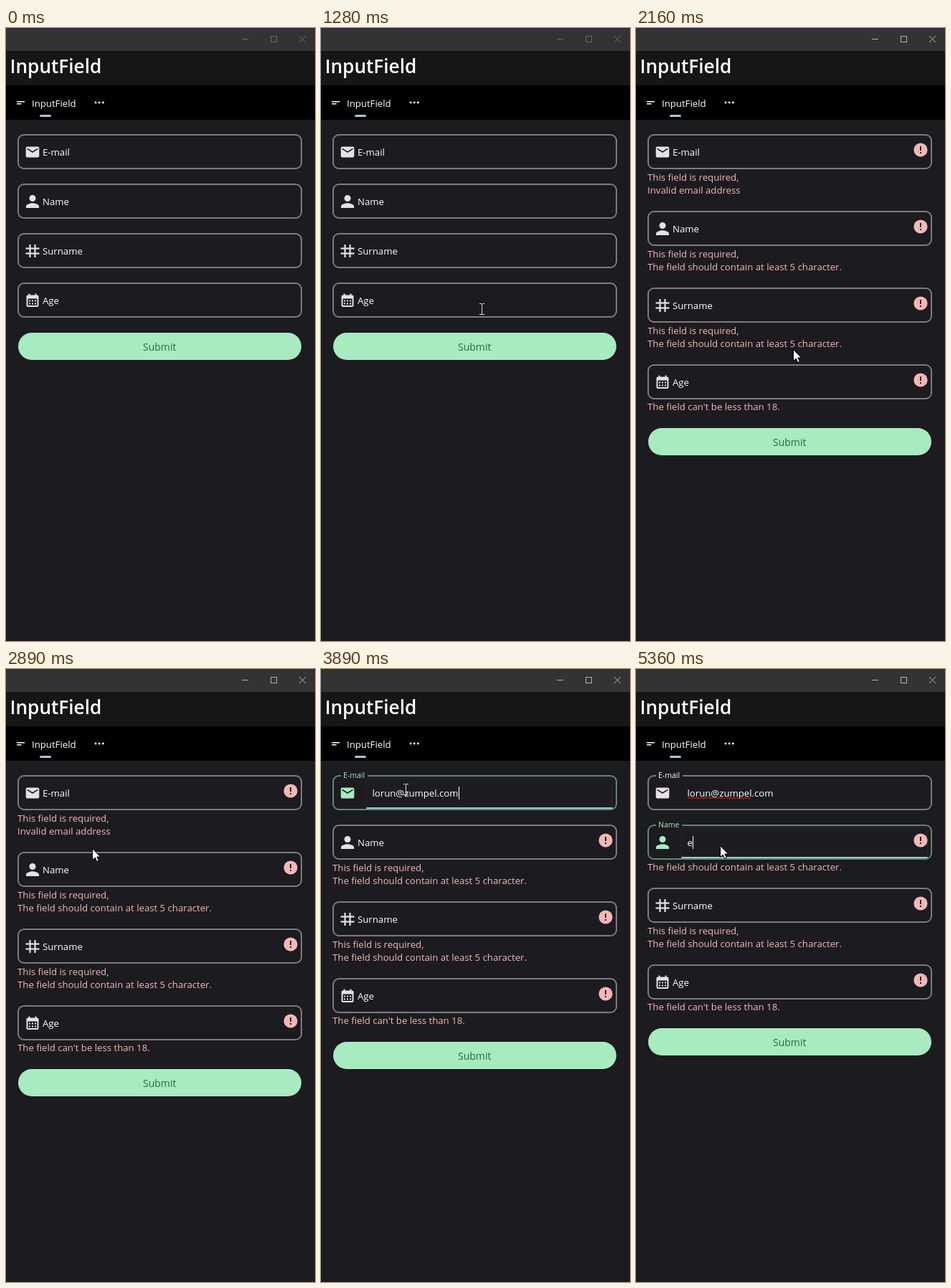
These frames come from a looping animation (431x855 px, 5.43 s). An HTML page with a canvas:

```html
<!DOCTYPE html>
<html lang="en">
<head>
<meta charset="utf-8">
<title>Form validation</title>
<style>
  html, body { margin: 0; width: 100%; height: 100%; overflow: hidden; background: #1c1b20; }
  canvas { display: block; width: 431px; height: 855px; }
</style>
</head>
<body>
<canvas id="stage" width="431" height="855"></canvas>
<script>
const ctx = document.getElementById('stage').getContext('2d');
const LOOP = 5430, TICK = 67;
const BG = '#1c1b20', LIGHT = '#e5e1e5', GREEN = '#a8ebc0', PINK = '#f2b8b5', BLUE = '#a5c6d3';
const EMAIL = 'lorun@zumpel.com';
const REQUIRED = 'This field is required,';
const TOO_SHORT = 'The field should contain at least 5 character.';

// Moments of the hard changes, in ms
const AT = { pointer: 390, active: 2020, errors: 2090, emailFocus: 3290, emailTyped: 3890,
             emailBlur: 4420, nameFocus: 4490, nameTyped: 5230, arrow: 5360 };

// Pointer waypoints: time, x, y
const PATH = [
  [402, 395, 812], [536, 290, 480], [670, 170, 240], [804, 118, 135], [871, 152, 116],
  [938, 160, 114], [1072, 225, 215], [1139, 242, 290], [1206, 236, 350], [1273, 224, 392],
  [1340, 221, 420], [1474, 219, 439], [1608, 219, 448],
  [2613, 219, 448], [2680, 210, 425], [2814, 150, 300], [2948, 90, 200], [3015, 76, 166],
  [3082, 80, 164], [3216, 118, 168],
  [3953, 118, 168], [4154, 117, 205], [4288, 116, 236], [4422, 117, 246]
];

const MAIL = new Path2D('M20 4H4c-1.1 0-2 .9-2 2v12c0 1.1.9 2 2 2h16c1.1 0 2-.9 2-2V6c0-1.1-.9-2-2-2zm0 4-8 5-8-5V6l8 5 8-5v2z');
const PERSON = new Path2D('M12 12a4 4 0 1 0 0-8 4 4 0 0 0 0 8zm0 2c-2.67 0-8 1.34-8 4v2h16v-2c0-2.66-5.33-4-8-4z');
const ARROW = new Path2D('M.5.5V16.5L4.2 13 6.7 18.5 9.3 17.4 6.9 12H11.6Z');

function rect(x, y, w, h, color) {
  ctx.fillStyle = color;
  ctx.fillRect(x, y, w, h);
}

function pill(x, y, w, h, r, color) {
  ctx.fillStyle = color;
  ctx.beginPath();
  ctx.roundRect(x, y, w, h, r);
  ctx.fill();
}

function line(color, width, ...points) {
  ctx.strokeStyle = color;
  ctx.lineWidth = width;
  ctx.beginPath();
  points.forEach(([x, y]) => ctx.lineTo(x, y));
  ctx.stroke();
}

function disc(x, y, r, color) {
  ctx.fillStyle = color;
  ctx.beginPath();
  ctx.arc(x, y, r, 0, 2 * Math.PI);
  ctx.fill();
}

function text(str, x, y, color, size = 13.2, weight = 400) {
  ctx.font = `${weight} ${size}px "Open Sans", "Noto Sans", sans-serif`;
  ctx.fillStyle = color;
  ctx.fillText(str, x, y);
  return ctx.measureText(str).width;
}

function glyph(path, x, y, scale, color) {
  ctx.save();
  ctx.translate(x, y);
  ctx.scale(scale, scale);
  ctx.translate(-12, -12);
  ctx.fillStyle = color;
  ctx.fill(path);
  ctx.restore();
}

// Field icons, each centred on x, y
const icons = {
  mail: (x, y, c) => glyph(MAIL, x, y, 0.93, c),
  person: (x, y, c) => glyph(PERSON, x, y, 1.13, c),
  hash(x, y, c) {
    for (const d of [-3.5, 3.5]) {
      line(c, 2.2, [x + d, y - 9], [x + d, y + 9]);
      line(c, 2.2, [x - 9.5, y + d], [x + 9.5, y + d]);
    }
  },
  calendar(x, y, c) {
    pill(x - 8.5, y - 7.5, 17, 16.5, 2, c);
    for (const d of [-5.5, 3.5]) rect(x + d, y - 9.5, 2, 3, c);
    rect(x - 6.5, y - 2.5, 13, 9.5, BG);
    for (let i = 0; i < 6; i++) rect(x - 5 + (i % 3) * 4, y - 0.5 + (i > 2 ? 4 : 0), 2, 2, c);
  }
};

function windowFrame(active) {
  rect(0, 0, 431, 855, BG);
  rect(0, 0, 431, 32, '#333333');
  rect(0, 0, 431, 1, '#2b2b3c');
  rect(0, 32, 431, 48, '#161616');
  rect(0, 80, 431, 48, '#000');
  const c = active ? '#b4b4b4' : '#6c6c6c';
  line(c, 1, [329, 15.5], [338, 15.5]);
  ctx.strokeRect(369.5, 11.5, 8, 8);
  line(c, 1, [409, 11], [418, 20]);
  line(c, 1, [418, 11], [409, 20]);

  text('InputField', 5.5, 63, '#fff', 26.2, 600);
  rect(15, 102, 11, 1.5, '#fff');
  rect(15, 105, 6.5, 1.5, '#fff');
  text('InputField', 36, 110, '#fff');
  for (let i = 0; i < 3; i++) disc(125 + i * 5.2, 104, 1.4, '#fff');
  pill(47, 121, 16, 3, 1.5, BLUE);
}

function outline(y, gapEnd, color) {
  ctx.strokeStyle = color;
  ctx.lineWidth = 2;
  ctx.beginPath();
  ctx.roundRect(17, y + 1, 395, 47, 8);
  ctx.stroke();
  if (gapEnd) rect(28, y - 1, gapEnd - 28, 4, BG);
}

function squiggle(x, y, width) {
  const points = [];
  for (let i = 0; i <= width; i += 2) points.push([x + i, y + (i % 4 ? 1 : -1)]);
  line('#e0202c', 1, ...points);
}

function drawField(f) {
  const { y, focused, float } = f;
  const accent = focused ? GREEN : LIGHT;
  const labelSize = 13.2 - 2.7 * float;
  ctx.font = `${labelSize}px "Open Sans", "Noto Sans", sans-serif`;
  const gapEnd = float ? 35 + ctx.measureText(f.label).width : 0;

  outline(y, gapEnd, focused ? '#5d8a70' : '#7c7b7e');
  icons[f.icon](37, y + 25, accent);

  if (focused) {
    pill(62.5, y + 4, 344.5, 43, 4, '#29282d');
    pill(63.5, y + 5, 342.5, 41, 3, '#1d1c20');
    pill(63, y + 45, 344, 2, 1, BLUE);
  }
  text(f.label, 51 - 20 * float, y + 30 - 26 * float, focused ? GREEN : '#fff', labelSize);

  const width = f.value ? text(f.value, 71.5, y + 30, '#fff') : 0;
  if (focused && float === 1) rect(Math.round(72 + width), y + 16, 1, 18, '#fff');
  if (f.misspelt) squiggle(72, y + 32, 88);

  if (f.errors.length) {
    disc(397, y + 22, 9.6, PINK);
    rect(396, y + 17, 2, 6, BG);
    rect(396, y + 25, 2, 2, BG);
  }
  const first = y + (f.errors.length > 1 ? 65 : 64);
  f.errors.forEach((msg, i) => text(msg, 16, first + 18 * i, PINK));
}

function fieldsAt(t) {
  const failed = t >= AT.errors;
  const floatFrom = start => t < start ? 0 : t < start + 70 ? 0.5 : 1;
  const typedEmail = t >= AT.emailTyped, typedName = t >= AT.nameTyped;
  const fields = [
    { label: 'E-mail', icon: 'mail', float: floatFrom(AT.emailFocus),
      focused: t >= AT.emailFocus && t < AT.emailBlur,
      value: typedEmail ? EMAIL : '', misspelt: t >= AT.emailBlur,
      errors: typedEmail ? [] : [REQUIRED, 'Invalid email address'] },
    { label: 'Name', icon: 'person', float: floatFrom(AT.nameFocus),
      focused: t >= AT.nameFocus, value: typedName ? 'e' : '',
      errors: typedName ? [TOO_SHORT] : [REQUIRED, TOO_SHORT] },
    { label: 'Surname', icon: 'hash', float: 0, errors: [REQUIRED, TOO_SHORT] },
    { label: 'Age', icon: 'calendar', float: 0, errors: ["The field can't be less than 18."] }
  ];
  let y = 148;
  for (const f of fields) {
    if (!failed) f.errors = [];
    f.y = y;
    y += 69 + 19 * f.errors.length;
  }
  return { fields, buttonY: y + 1 };
}

function pointerAt(t) {
  const s = Math.floor((t + 12) / TICK) * TICK;
  const next = PATH.findIndex(p => p[0] > s);
  if (next < 0) return PATH[PATH.length - 1].slice(1);
  const b = PATH[next], a = PATH[Math.max(0, next - 1)];
  const k = a === b ? 0 : (s - a[0]) / (b[0] - a[0]);
  return [1, 2].map(i => Math.round(a[i] + (b[i] - a[i]) * k));
}

function drawPointer(t, fields) {
  if (t < AT.pointer) return;
  const [x, y] = pointerAt(t);
  const overField = fields.some(f => x > 62 && x < 407 && y > f.y && y < f.y + 49);
  if (overField && t < AT.arrow) {
    rect(x, y - 7, 1, 15, '#dcdcdc');
    for (const end of [y - 8, y + 7]) {
      rect(x - 3, end, 3, 1, '#dcdcdc');
      rect(x + 1, end, 3, 1, '#dcdcdc');
    }
    return;
  }
  ctx.save();
  ctx.translate(x, y);
  ctx.fillStyle = '#fff';
  ctx.strokeStyle = '#000';
  ctx.lineWidth = 1;
  ctx.fill(ARROW);
  ctx.stroke(ARROW);
  ctx.restore();
}

function draw(now) {
  const t = now % LOOP;
  const { fields, buttonY } = fieldsAt(t);
  windowFrame(t >= AT.active);
  fields.forEach(drawField);
  pill(17, buttonY, 395, 38, 19, GREEN);
  text('Submit', 191, buttonY + 24.5, '#226d44', 14);
  drawPointer(t, fields);
}

const start = performance.now();
function loop() {
  draw(performance.now() - start);
  requestAnimationFrame(loop);
}
loop();
</script>
</body>
</html>
```
